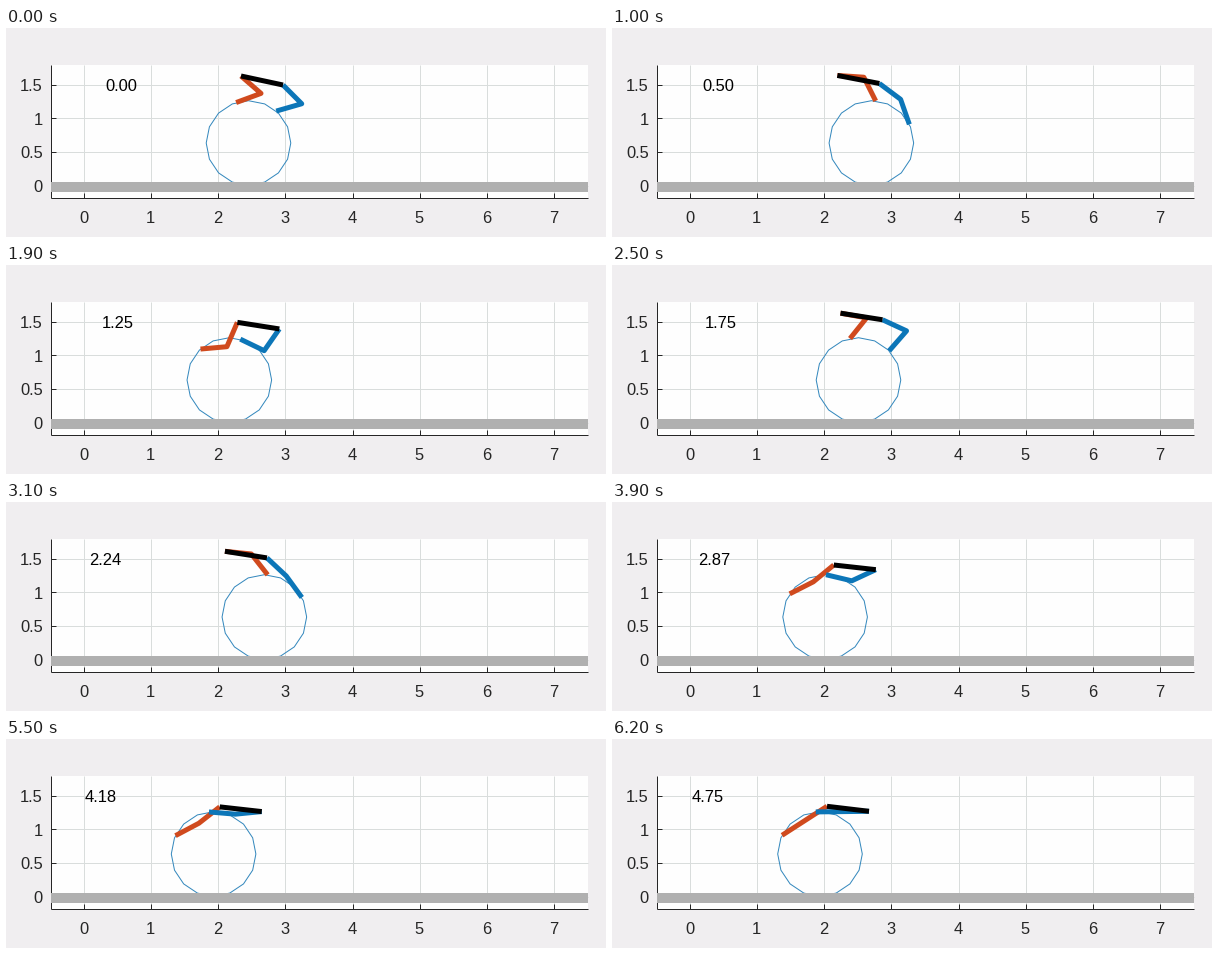
Animation of 600x209 px, one loop 6.3 s. Source, as a matplotlib script:

```python
import numpy as np
import matplotlib.pyplot as plt
from matplotlib.animation import FuncAnimation
from matplotlib.patches import Rectangle

W, H, DPI = 600, 209, 64
PT = 72 / DPI
HOLD, FRAMES = 3, 63

UNIT, X0, Y0 = 67.15, 78, 157.5
LEFT, RIGHT, TOP, BOTTOM = 45, 582, 37, 170
RADIUS, BALL_X, BALL_Y = 42.3, 242.5, 115
LIMB, TORSO = 26.5, 42

INK, GRID = "#262626", "#d9dddc"
BLUE, ORANGE, RIM = "#0c76b8", "#d04a1e", "#3488bd"

plt.rcParams["font.family"] = "Liberation Sans"


def swing(*turns):
    """Cosine easing from one turning point (step, value) to the next."""
    steps, values = zip(*turns)

    def at(s):
        u = np.interp(s, steps, range(len(steps)))
        i = min(int(u), len(steps) - 2)
        ease = (1 - np.cos(np.pi * (u - i))) / 2
        return values[i] + (values[i + 1] - values[i]) * ease

    return at


ball_x = swing((0, BALL_X), (4.5, 263), (17.5, 222), (25.5, 263), (39, 206.5), (59, 208))
hip_x = swing((0, 235), (8, 225), (18, 232), (30, 218), (37, 222), (47, 213), (59, 215))
hip_y = swing((0, 48), (4, 46), (17, 57.5), (24, 46), (28, 49.3), (31, 43.5),
              (38.5, 69.5), (59, 67.3))
tilt = swing((0, 9), (16, 6.6), (28, 6.6), (40, 4), (59, 5))


def clock(s):
    return np.interp(s, [1, 28, 36, 59], [0, 2.2445, 2.872, 4.754])


def foot(x, degrees):
    """Point fixed to the rolling ball."""
    a = np.radians(degrees) - (x - BALL_X) / RADIUS
    return np.array([x + RADIUS * np.cos(a), BALL_Y - RADIUS * np.sin(a)])


def leg(joint, end):
    """Two equal limbs, bent to the right of the line from joint to end."""
    d = end - joint
    dist = np.hypot(*d)
    bend = np.sqrt(max(LIMB**2 - dist**2 / 4, 0))
    knee = (joint + end) / 2 + bend * np.array([d[1], -d[0]]) / dist
    return np.array([joint, knee, end]).T


fig = plt.figure(figsize=(W / DPI, H / DPI), dpi=DPI, facecolor="#f0eef0")
ax = fig.add_axes([0, 0, 1, 1])
ax.set(xlim=(0, W), ylim=(H, 0))
ax.axis("off")


def stroke(xs, ys, color, width, z):
    return ax.plot(xs, ys, color=color, lw=width * PT, zorder=z,
                   solid_capstyle="butt", solid_joinstyle="round")[0]


def box(x, y, w, h, color, z):
    ax.add_patch(Rectangle((x, y), w, h, fc=color, ec="none", zorder=z))


def label(x, y, text, color=INK, **kw):
    return ax.text(x, y, text, color=color, fontsize=16.5 * PT,
                   va="center_baseline", zorder=9, **kw)


box(LEFT, TOP, RIGHT - LEFT, BOTTOM - TOP, "#fefefe", 0)
for i in range(8):
    x = X0 + UNIT * i
    stroke([x, x], [TOP, BOTTOM], GRID, 1, 1)
    stroke([x, x], [BOTTOM - 5, BOTTOM], INK, 1, 2)
    label(x - 0.5, 189, str(i), ha="center")
for v in (0, 0.5, 1, 1.5):
    y = Y0 - UNIT * v
    stroke([LEFT, RIGHT], [y, y], GRID, 1, 1)
    stroke([LEFT, LEFT + 5], [y, y], INK, 1, 2)
    label(36.7, y + 0.5, f"{v:g}", ha="right")
stroke([LEFT, LEFT], [TOP, BOTTOM], INK, 1, 2)
stroke([LEFT, RIGHT], [BOTTOM, BOTTOM], INK, 1, 2)
box(LEFT, 154, RIGHT - LEFT, 10, "#b0b0b0", 7)

ring = np.linspace(0, 2 * np.pi, 17)
ball = stroke([], [], RIM, 1, 3)
rear = stroke([], [], ORANGE, 5, 4)
front = stroke([], [], BLUE, 5, 5)
torso = stroke([], [], "black", 5, 6)
readout = label(0, 57.3, "", "black", ha="left")


def update(n):
    s = max(0, n - HOLD)
    x = ball_x(s)
    hip = np.array([hip_x(s), hip_y(s)])
    shoulder = hip + [TORSO, tilt(s)]
    ball.set_data(x + RADIUS * np.cos(ring), BALL_Y + RADIUS * np.sin(ring))
    rear.set_data(*leg(hip, foot(x, 107)))
    front.set_data(*leg(shoulder, foot(x, 49)))
    torso.set_data(*np.array([hip, shoulder]).T)
    readout.set_x(hip[0] - 2 * UNIT - 1.2)
    readout.set_text(f"{clock(s):.2f}")
    return ball, rear, front, torso, readout


anim = FuncAnimation(fig, update, frames=FRAMES, interval=100, repeat=True,
                     repeat_delay=0, blit=False)
plt.show()
```
